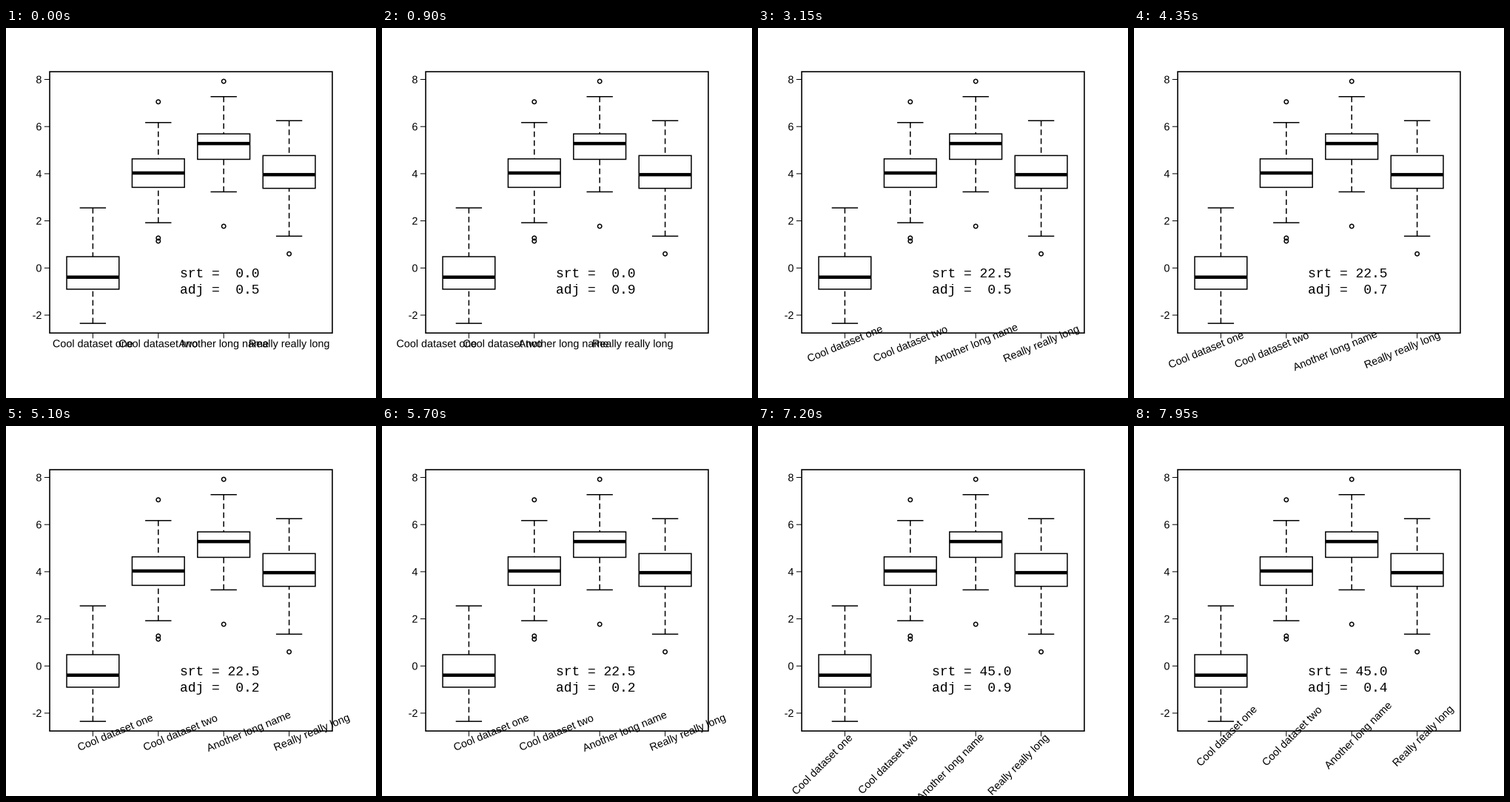
Recreate the animation shown at these times as a matplotlib script. Size 500 by 500 pixels, loop 8000 ms.

```python
import matplotlib.pyplot as plt
from matplotlib.animation import FuncAnimation
from matplotlib.patches import Circle, PathPatch, Rectangle
from matplotlib.textpath import TextPath
from matplotlib.transforms import Affine2D

PX = 0.72                       # points per pixel at 100 dpi
EM = 14.4                       # text size in pixels
LEFT, RIGHT, TOP, BOTTOM = 59.04, 440.96, 59.04, 412.16
UNIT_X = (RIGHT - LEFT) / 4.32
ZERO_Y, UNIT_Y = 324.3, 31.85
LABEL_Y = 426.5
STEP_MS, INTERVAL, LOOP = 150, 50, 8000

NAMES = ["Cool dataset one", "Cool dataset two",
         "Another long name", "Really really long"]
# low whisker, first quartile, median, third quartile, high whisker, outliers
STATS = [(-2.35, -0.90, -0.39, 0.48, 2.55, []),
         (1.92, 3.42, 4.03, 4.63, 6.17, [7.05, 1.27, 1.14]),
         (3.23, 4.61, 5.28, 5.69, 7.27, [7.92, 1.77]),
         (1.35, 3.38, 3.96, 4.77, 6.25, [0.60])]

fig = plt.figure(figsize=(5, 5), dpi=100, facecolor="white")
ax = fig.add_axes([0, 0, 1, 1])
ax.set(xlim=(0, 500), ylim=(500, 0))
ax.axis("off")


def x_at(group):
    return LEFT + (group - 0.34) * UNIT_X


def y_at(value):
    return ZERO_Y - value * UNIT_Y


def line(x0, y0, x1, y1, width=1.5, **style):
    ax.plot([x0, x1], [y0, y1], color="black", lw=width * PX,
            solid_capstyle="butt", snap=False, **style)


def rect(x0, y0, x1, y1, width=1.5):
    ax.add_patch(Rectangle((x0, y0), x1 - x0, y1 - y0, fill=False,
                           ec="black", lw=width * PX, snap=False))


def glyphs(text):
    path = TextPath((0, 0), text, size=EM, prop={"family": "Liberation Sans"})
    patch = PathPatch(path, fc="black", lw=0, zorder=5, clip_on=False)
    ax.add_patch(patch)
    return patch


def place(patch, x, y, adj, angle, width):
    move = (Affine2D().translate(-adj * width, -EM / 3).rotate_deg(angle)
            .scale(1, -1).translate(x, y))
    patch.set_transform(move + ax.transData)


def text_width(text):
    """Advance width, taken between two identical marker glyphs."""
    def right(s):
        path = TextPath((0, 0), s, size=EM, prop={"family": "Liberation Sans"})
        return path.get_extents().x1
    return right(text + "l") - right("l")


def draw_box(x, low, q1, median, q3, high, outliers):
    half, staple = 0.4 * UNIT_X, 0.2 * UNIT_X
    for end, hinge in ((low, q1), (high, q3)):
        line(x, y_at(end), x, y_at(hinge), dashes=(5, 3),
             dash_capstyle="butt")
        line(x - staple, y_at(end), x + staple, y_at(end))
    rect(x - half, y_at(q3), x + half, y_at(q1))
    line(x - half, y_at(median), x + half, y_at(median), 4.5)
    for value in outliers:
        ax.add_patch(Circle((x, y_at(value)), 2.7, fill=False,
                            ec="black", lw=1.5 * PX))


rect(LEFT, TOP, RIGHT, BOTTOM, 1.6)
for group, stats in enumerate(STATS, 1):
    draw_box(x_at(group), *stats)
    line(x_at(group), BOTTOM, x_at(group), BOTTOM + EM / 2, 1)
for value in range(-2, 9, 2):
    line(LEFT, y_at(value), LEFT - EM / 2, y_at(value), 1)
    place(glyphs(str(value)), 48.4, y_at(value) + 0.3, 1, 0,
          text_width(str(value)))

labels = [glyphs(name) for name in NAMES]
widths = [text_width(name) for name in NAMES]
readout = [ax.text(234.6, y, "", family="Liberation Mono", size=18 * PX,
                   va="baseline") for y in (337, 359)]


def pose(step):
    """The alignment swings 0.5, 1, 0, 0.5, then the angle grows."""
    turn, k = divmod(step, 21)
    tenths = 5 + k if k <= 5 else abs(15 - k)
    return 22.5 * turn, tenths / 10


def update(i):
    angle, adj = pose(i * INTERVAL // STEP_MS)
    for group, (label, width) in enumerate(zip(labels, widths), 1):
        place(label, x_at(group), LABEL_Y, adj, angle, width)
    readout[0].set_text(f"srt = {angle:4.1f}")
    readout[1].set_text(f"adj = {adj:4.1f}")
    return labels + readout


anim = FuncAnimation(fig, update, frames=LOOP // INTERVAL, interval=INTERVAL,
                     repeat=True, repeat_delay=0, blit=False)
plt.show()
```
